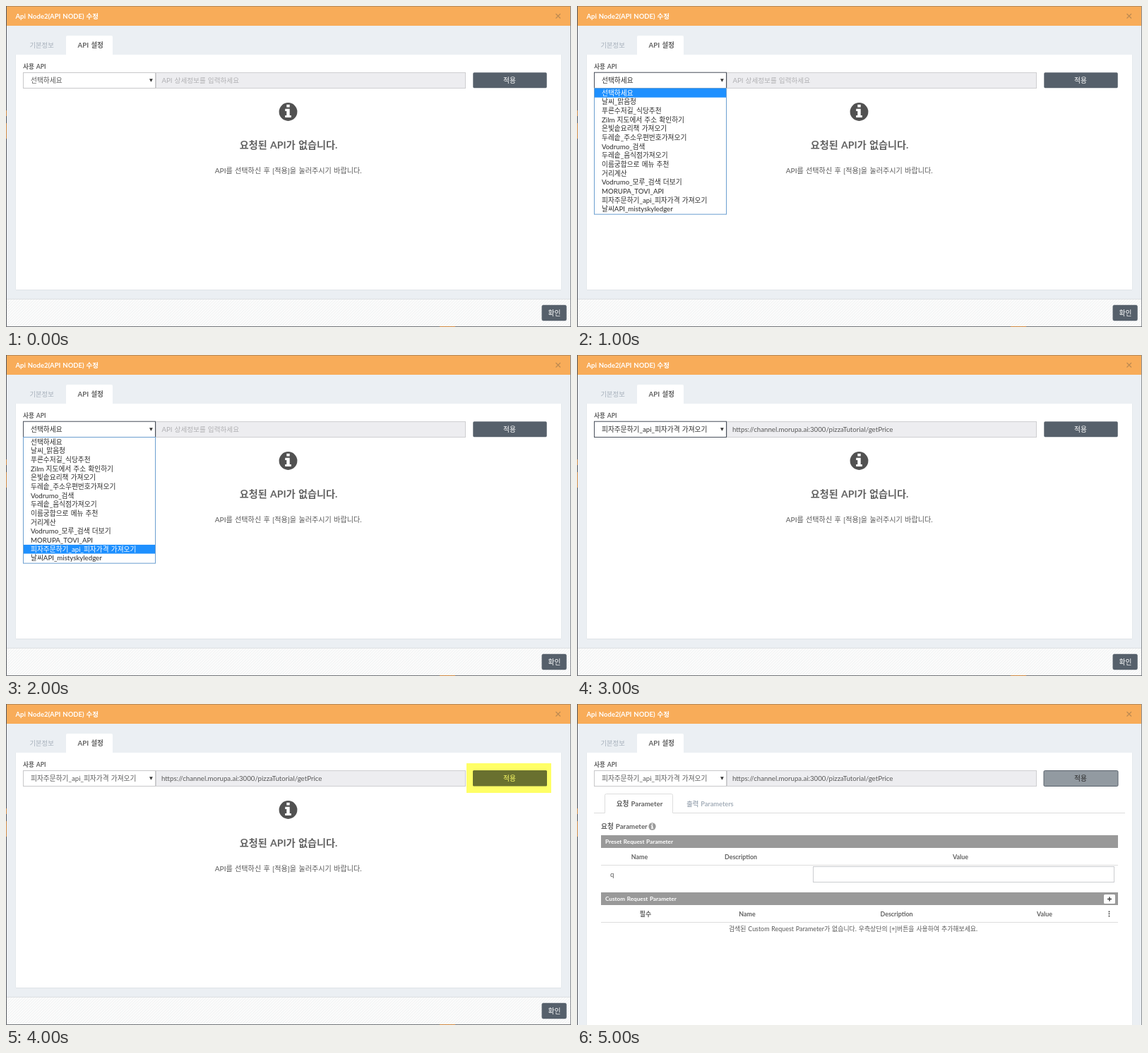
An HTML page that plays this animation: 800x455 px, repeating every 6000 ms.

```html
<!DOCTYPE html>
<html lang="ko">
<head>
<meta charset="utf-8">
<title>API 설정</title>
<style>
html, body { margin: 0; width: 100%; height: 100%; overflow: hidden; background: #ebeff3; }
svg { display: block; width: 100%; height: 100%; }
text { font: 9.7px Lato, "Noto Sans CJK KR", "Noto Sans CJK", sans-serif; word-spacing: .07em; fill: #585858; }
.b { font-weight: 700; fill: #626262; }
.mid { text-anchor: middle; }
.small { font-size: 8.9px; }
.bar { font-size: 8.2px; }
.white { fill: #fff; }
.dim { fill: #a5afba; }
.dark text:not(.white) { fill: #2a2a2a; }
.edge { fill: none; stroke: #ddd; }
.button { fill: #56606b; stroke: #56606b; stroke-opacity: .45; }

/* Each .show part appears at --at and stays for the seconds in its class. */
.show { visibility: hidden; animation: 6s step-end calc(var(--at) * 1s - 6s) infinite; }
.s1 { animation-name: one; }
.s2 { animation-name: two; }
.s3 { animation-name: three; }
.s4 { animation-name: four; }
.s5 { animation-name: five; }
@keyframes one   { 0% { visibility: visible } 16.666%, 100% { visibility: hidden } }
@keyframes two   { 0% { visibility: visible } 33.333%, 100% { visibility: hidden } }
@keyframes three { 0% { visibility: visible } 50%, 100% { visibility: hidden } }
@keyframes four  { 0% { visibility: visible } 66.666%, 100% { visibility: hidden } }
@keyframes five  { 0% { visibility: visible } 83.333%, 100% { visibility: hidden } }
</style>
</head>
<body>
<svg viewBox="0 0 800 455" preserveAspectRatio="none">
  <defs>
    <pattern id="hatch" width="4" height="4" patternUnits="userSpaceOnUse">
      <rect width="4" height="4" fill="#fbfbfb"/>
      <path d="M-1 1L1 -1M0 4L4 0M3 5L5 3" stroke="#eef0f0" stroke-width=".8"/>
    </pattern>
    <g id="info">
      <circle r="12.9"/>
      <path d="M-2.200-10.300h4.400v3.800h-4.400zM-4.300-4.300h6.500v9.200h2.100v3.200h-8.600v-3.200h2.100v-6h-2.100z" fill="#fff"/>
    </g>
  </defs>

  <rect width="800" height="455" fill="#ebeff3"/>
  <rect width="800" height="28" fill="#f8ac59"/>
  <path d="M0 .5H800" stroke="#b58958"/>
  <path d="M.5 0V455" stroke="#55585e"/>
  <path d="M.5 148v8M.5 166v22" stroke="#d08a45"/>
  <path d="M799.500 0V455" stroke="#8d9095"/>
  <text x="13.500" y="17.500" class="b white" style="font-size:9.5px">Api Node2(API NODE) 수정</text>
  <path d="M778.500 11l6.500 6.500m0-6.500l-6.500 6.500" stroke="#bd8a51" stroke-width="1.200"/>

  <rect x="13" y="69" width="774" height="386" fill="#e5e9ed"/>
  <rect x="14" y="69" width="772" height="386" fill="#fff"/>
  <path d="M85 70V44q0-2 2-2h62q2 0 2 2v26z" fill="#fff"/>
  <text x="33.500" y="58.500" class="dim" style="font-size:9.3px">기본정보</text>
  <text x="101.500" y="58.500" class="b">API 설정</text>
  <text x="24" y="88.500" class="b" style="font-size:8.7px">사용 API</text>

  <rect x="212.500" y="94.500" width="438" height="22" fill="#ededf0" stroke="#cfcfd1"/>
  <text x="220.500" y="108.700" class="show s3" style="--at:0;fill:#b0b0b3;font-size:9.6px">API 상세정보를 입력하세요</text>
  <text x="220" y="108.500" class="show s3" style="--at:3">https://channel.morupa.ai:3000/pizzaTutorial/getPrice</text>

  <rect x="24.500" y="94.500" width="187" height="22" fill="#fff" stroke="#c8c8ca"/>
  <rect x="24.500" y="94.200" width="187" height="22.300" fill="#fff" stroke="#4a515c" class="show s3" style="--at:1"/>
  <path d="M203 103.200h4.800l-2.400 4.500z" fill="#333"/>
  <text x="35" y="108.700" class="show s1" style="--at:0">선택하세요</text>
  <g class="show s2 dark" style="--at:1"><text x="35" y="108.700">선택하세요</text></g>
  <g class="show s1 dark" style="--at:3"><text x="35" y="108.700" data-chosen></text></g>
  <text x="35" y="108.700" class="show s2" style="--at:4" data-chosen></text>

  <g class="show s4" style="--at:0">
    <rect x="661.500" y="94.500" width="104" height="21.500" rx="1.500" class="button"/>
    <text x="713" y="108.700" class="mid white">적용</text>
  </g>
  <g class="show s1" style="--at:4">
    <rect x="652" y="84" width="120" height="42" fill="#ffff66"/>
    <rect x="661" y="94" width="105" height="22.500" rx="1.500" fill="#69702f"/>
    <text x="713" y="108.700" class="mid" style="fill:#ffff66">적용</text>
  </g>
  <g class="show s1 dark" style="--at:5">
    <rect x="661" y="94.500" width="105" height="22" rx="1.500" fill="#929aa1" stroke="#59626c"/>
    <text x="713" y="108.700" class="mid">적용</text>
  </g>

  <g class="show s5" style="--at:0">
    <use href="#info" x="399.500" y="150" fill="#515151"/>
    <text x="400" y="202" class="mid b" style="font-size:14.1px">요청된 API가 없습니다.</text>
    <text x="399.700" y="236.500" class="mid" style="font-size:10.1px">API를 선택하신 후 [적용]을 눌러주시기 바랍니다.</text>
    <rect x="1" y="402" width="798" height="14" fill="#ebeff3"/>
    <path d="M14 402.500H786" stroke="#dfe3e7"/>
    <rect x="1" y="415" width="798" height="39" fill="url(#hatch)"/>
    <path d="M1 415.500H799" stroke="#dcdfe2"/>
    <path d="M0 454.500H800" stroke="#74777b"/>
    <path d="M614 454.500h22" stroke="#d08a45"/>
    <rect x="758.800" y="424" width="34.700" height="22" rx="2" class="button"/>
    <text x="776.500" y="438.500" class="mid white">확인</text>
  </g>

  <g class="show s1" style="--at:5">
    <path class="edge" d="M24 154.500H39.500V129.500q0-2 2-2H133.500q2 0 2 2V154.500H776"/>
    <text x="88.500" y="144.500" class="mid b">요청 Parameter</text>
    <text x="188.500" y="144.500" class="mid b dim" style="font-size:9.2px">출력 Parameters</text>
    <text x="34" y="177" class="b">요청 Parameter</text>
    <use href="#info" transform="translate(106.500 173.500) scale(.4)" fill="#999"/>

    <rect x="34" y="186" width="732" height="18" fill="#999"/>
    <text x="40" y="198" class="b bar white">Preset Request Parameter</text>
    <g id="presetHead"></g>
    <path class="edge" d="M34 228.500H766"/>
    <text x="47" y="244.500">q</text>
    <rect x="334.500" y="230.500" width="426" height="22" fill="#fff" stroke="#cbcdd0"/>

    <rect x="34" y="267" width="732" height="18" fill="#999"/>
    <text x="40" y="279" class="b bar white">Custom Request Parameter</text>
    <rect x="746" y="270" width="16" height="13" rx="1.500" fill="#fff"/>
    <path d="M751 276.500h6m-3-3v6" stroke="#444" stroke-width="1.500"/>
    <g id="customHead"></g>
    <path d="M753.500 293.500v8" stroke="#444" stroke-width="1.700" stroke-dasharray="1.700 1.400"/>
    <path class="edge" d="M34 309.500H766"/>
    <text x="391" y="321.500" class="mid small">검색된 Custom Request Parameter가 없습니다. 우측상단의 [+]버튼을 사용하여 추가해보세요.</text>
  </g>

  <g class="show s2 dark" style="--at:1">
    <rect x="24.500" y="116.500" width="187" height="178.700" fill="#fff" stroke="#6c9fd0"/>
    <g id="options"></g>
  </g>
  <g class="show s1" style="--at:1" data-pick="0"></g>
  <g class="show s1" style="--at:2" data-pick="12"></g>
</svg>
<script>
const options = [
  '선택하세요', '날씨_맑음청', '푸른수저길_식당추천', 'Zilm 지도에서 주소 확인하기',
  '은빛솥요리책 가져오기', '두레솥_주소우편번호가져오기', 'Vodrumo_검색',
  '두레솥_음식점가져오기', '이름궁합으로 메뉴 추천', '거리계산',
  'Vodrumo_모루_검색 더보기', 'MORUPA_TOVI_API',
  '피자주문하기_api_피자가격 가져오기', '날씨API_mistyskyledger'
];
const rowHeight = 12.66;
const rowTop = i => 117 + i * rowHeight;
const label = (x, y, text, cls = '') => `<text x="${x}" y="${y}" class="${cls}">${text}</text>`;
const row = (i, cls) => label(35, rowTop(i) + 9.8, options[i], cls);
const heads = (y, cells) =>
  cells.map(([x, text]) => label(x, y, text, 'mid b small')).join('');
const byId = id => document.getElementById(id);

byId('options').innerHTML = options.map((_, i) => row(i)).join('');
document.querySelectorAll('[data-pick]').forEach(g => {
  const i = +g.dataset.pick;
  g.innerHTML = `<rect x="25" y="${rowTop(i)}" width="186" height="${rowHeight}" fill="#1e90ff"/>` + row(i, 'white');
});
document.querySelectorAll('[data-chosen]').forEach(t => { t.textContent = options[12]; });
byId('presetHead').innerHTML = heads(219.5, [[88.5, 'Name'], [232, 'Description'], [543, 'Value']]);
byId('customHead').innerHTML = heads(300.5, [[97, '필수'], [241, 'Name'], [452.5, 'Description'], [662, 'Value']]);
</script>
</body>
</html>
```
